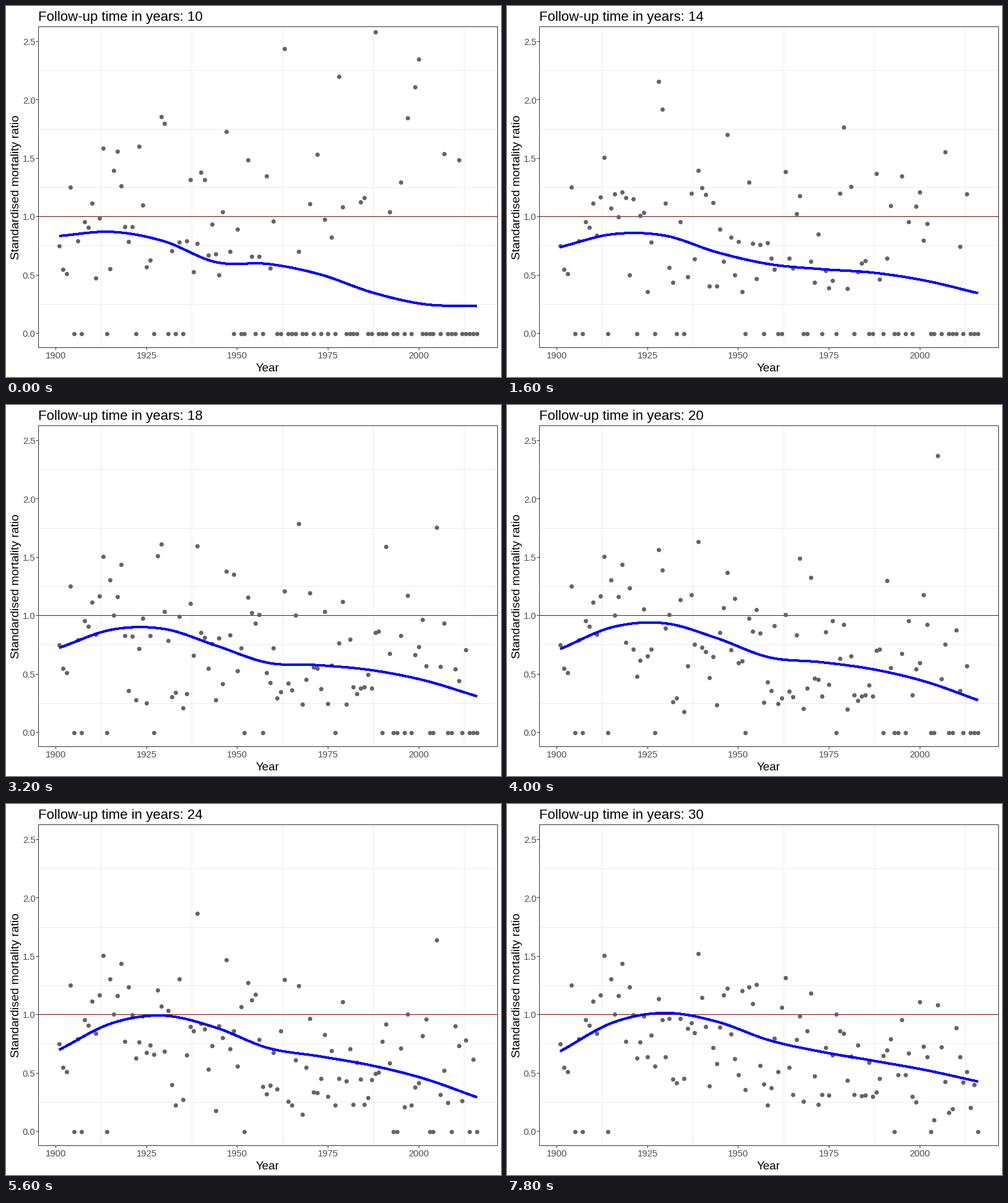
Animation of 800 by 600 pixels, one loop 8000 ms. Source, as a matplotlib script:

```python
import numpy as np
import matplotlib.pyplot as plt
from matplotlib.animation import FuncAnimation
from matplotlib.patches import Rectangle

W, H, DPI = 800, 600, 100
PX = 72 / DPI                      # one pixel in points
FRAMES, INTERVAL = 40, 200
LEFT, TOP, RIGHT, BOTTOM = 52.5, 33.5, 794.5, 552.5
GREY20, GREY30, GREY92 = "#333333", "#4d4d4d", "#ebebeb"

YEARS = np.arange(1901, 2017)
AGE = (YEARS - YEARS[0]) / (len(YEARS) - 1)

# The first ten years have complete follow-up, so their ratios never change
SETTLED = [0.75, 0.55, 0.51, 1.255, 0, 0.79, 0, 0.955, 0.91, 1.115]

# Trend heights at nine evenly spaced years, by follow-up time
TREND = {
    10: [0.835, 0.87, 0.79, 0.61, 0.595, 0.505, 0.35, 0.25, 0.233],
    12: [0.74, 0.83, 0.81, 0.68, 0.61, 0.505, 0.46, 0.437, 0.452],
    16: [0.74, 0.87, 0.866, 0.71, 0.577, 0.596, 0.58, 0.466, 0.238],
    18: [0.725, 0.88, 0.887, 0.744, 0.596, 0.575, 0.532, 0.445, 0.31],
    22: [0.705, 0.924, 0.983, 0.87, 0.69, 0.628, 0.548, 0.424, 0.244],
    30: [0.686, 0.932, 1.017, 0.945, 0.787, 0.686, 0.609, 0.532, 0.44],
}

# Each year's cohort: expected deaths at ten years, their growth, and the
# arrival of the observed deaths as a Poisson process
rng = np.random.default_rng(7)
level = (2 - 1.5 * AGE) * rng.lognormal(0, 0.25, len(YEARS))
growth = 1.2 + 0.9 * AGE
arrivals = rng.exponential(1, (len(YEARS), 40)).cumsum(axis=1)


def ratios(follow_up):
    """Observed over expected deaths after a whole number of years."""
    t = np.minimum(follow_up, np.maximum(10, YEARS - 1900))
    expected = level * (t / 10) ** growth
    rate = 1 - 0.6 * AGE
    observed = (arrivals < (rate * expected)[:, None]).sum(axis=1)
    result = observed / expected
    result[:len(SETTLED)] = SETTLED
    return result


def smooth(knots):
    """Cubic curve through evenly spaced knots, sampled at 80 places."""
    k = np.array(knots)
    slope = np.gradient(k)
    u = np.linspace(0, len(k) - 1, 80)
    i = np.minimum(u.astype(int), len(k) - 2)
    t = u - i
    return ((2*t**3 - 3*t**2 + 1) * k[i] + (t**3 - 2*t**2 + t) * slope[i]
            + (3*t**2 - 2*t**3) * k[i + 1] + (t**3 - t**2) * slope[i + 1])


def trend_at(follow_up):
    columns = zip(*TREND.values())
    return smooth([np.interp(follow_up, list(TREND), c) for c in columns])


def year_x(year):
    return 80.5 + 5.865 * (year - 1900)


def ratio_y(ratio):
    return 529.5 - 188.8 * ratio


def crisp(v):
    """Centre of the pixel that holds v."""
    return np.floor(v) + 0.5


plt.rcParams["font.family"] = "Liberation Sans"
fig = plt.figure(figsize=(W / DPI, H / DPI), dpi=DPI, facecolor="white")
ax = fig.add_axes([0, 0, 1, 1])
ax.set_xlim(0, W)
ax.set_ylim(H, 0)
ax.axis("off")


def line(x, y, color, z):
    ax.plot(crisp(x), crisp(y), color=color, lw=PX, zorder=z, snap=False,
            solid_capstyle="butt")


def label(x, y, text, size, color="black", **kw):
    return ax.text(x, y, text, fontsize=size * PX, color=color,
                   va="baseline", **kw)


# Panel, grid, ticks and axis text
for year in np.arange(1912.5, 2016, 25):
    line([year_x(year)] * 2, [TOP, BOTTOM], GREY92, 1)
for ratio in np.arange(0.25, 2.5, 0.5):
    line([LEFT, RIGHT], [ratio_y(ratio)] * 2, GREY92, 1)
line([LEFT, RIGHT], [ratio_y(1)] * 2, "#8b0000", 2)

for year in range(1900, 2001, 25):
    x = year_x(year)
    line([x, x], [BOTTOM, BOTTOM + 4], GREY20, 5)
    label(x, 570, str(year), 14.9, GREY30, ha="center")
for ratio in np.arange(0, 2.6, 0.5):
    y = ratio_y(ratio)
    line([LEFT - 4, LEFT], [y, y], GREY20, 5)
    label(47.5, y + 5.7, f"{ratio:.1f}", 14.9, GREY30, ha="right")

label(422.5, 591, "Year", 18.9, ha="center")
label(21, 293, "Standardised mortality ratio", 19.3, ha="center",
      rotation=90, rotation_mode="anchor")
title = label(52, 24, "", 22.3, ha="left")

panel = Rectangle((LEFT, TOP), RIGHT - LEFT, BOTTOM - TOP, fill=False,
                  ec=GREY20, lw=PX, zorder=6, snap=False)
ax.add_patch(panel)

dots, = ax.plot(year_x(YEARS), ratio_y(ratios(10)), "o", ms=7 * PX, mew=0,
                color="#646464", zorder=3, antialiased=False)
dots.set_clip_path(panel)
trend, = ax.plot(np.linspace(year_x(YEARS[0]), year_x(YEARS[-1]), 80),
                 ratio_y(trend_at(10)), color="#0000ff", lw=3 * PX, zorder=4,
                 solid_capstyle="butt", antialiased=False)


def draw(i):
    # Every second frame shows a whole year, the others lie halfway
    before, after = 10 + i // 2, 10 + (i + 1) // 2
    title.set_text(f"Follow-up time in years: {round(10 + 50 * i / 99)}")
    dots.set_ydata(ratio_y((ratios(before) + ratios(after)) / 2))
    trend.set_ydata(ratio_y((trend_at(before) + trend_at(after)) / 2))
    return title, dots, trend


anim = FuncAnimation(fig, draw, frames=FRAMES, interval=INTERVAL,
                     repeat=True, repeat_delay=0)
plt.show()
```
